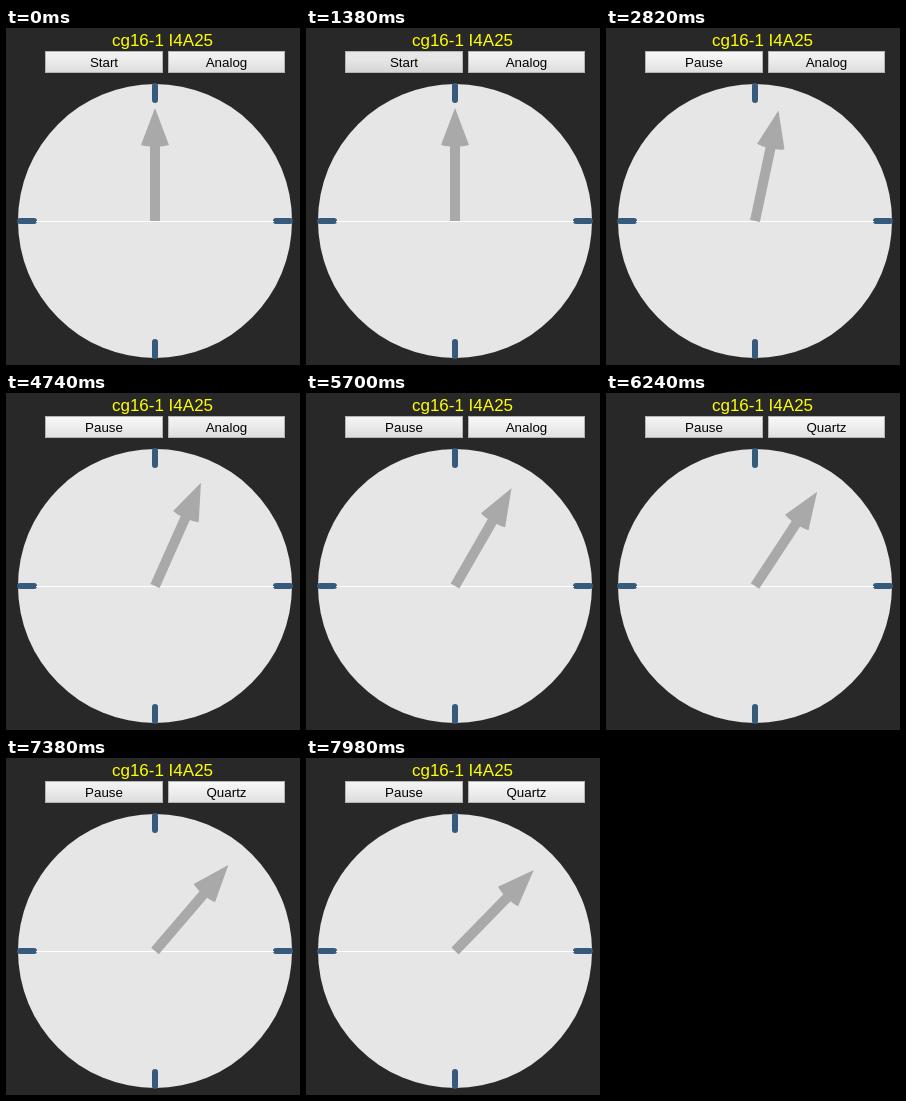
An HTML page that plays this animation: 294 by 337 pixels, repeating every 8000 ms.

```html
<!DOCTYPE html>
<html lang="en">
<head>
<meta charset="utf-8">
<title>Clock</title>
<style>
html, body { margin: 0; width: 100%; height: 100%; overflow: hidden; background: #292828; }
svg { display: block; width: 100%; height: 100%; }
text { font-family: "Liberation Sans", Arial, sans-serif; text-anchor: middle; }
</style>
</head>
<body>
<svg viewBox="0 0 294 337">
  <defs>
    <linearGradient id="idle" x2="0" y2="1">
      <stop stop-color="#f4f4f4"/><stop offset=".4" stop-color="#ececec"/><stop offset="1" stop-color="#dcdcdc"/>
    </linearGradient>
    <linearGradient id="hover" x2="0" y2="1">
      <stop stop-color="#f8f8f8"/><stop offset=".4" stop-color="#f0f0f0"/><stop offset="1" stop-color="#e0e0e0"/>
    </linearGradient>
    <linearGradient id="press" x2="0" y2="1">
      <stop stop-color="#e7e7e7"/><stop offset=".4" stop-color="#e5e5e5"/><stop offset="1" stop-color="#d6d6d6"/>
    </linearGradient>
  </defs>
  <rect width="294" height="337" fill="#292828"/>
  <text x="156.5" y="18" font-size="17" fill="#ff0">cg16-1 I4A25</text>
  <g id="run">
    <rect x="39.5" y="23.5" width="117" height="21" stroke="#b4b4b4"/>
    <text x="98" y="39" font-size="13.33"></text>
  </g>
  <g id="mode">
    <rect x="162.5" y="23.5" width="116" height="21" stroke="#b4b4b4"/>
    <text x="220.5" y="39" font-size="13.33"></text>
  </g>
  <circle cx="149" cy="193" r="137" fill="#e6e6e6"/>
  <path d="M149 58V72M149 314V328M14 193H28M270 193H284" stroke="#365a7b" stroke-width="6" stroke-linecap="round"/>
  <rect x="30" y="193" width="238" height="1" fill="#fff"/>
  <path id="hand" d="M149 80L163 117Q159 118.3 154 118.6V193H144V118.6Q139 118.3 135 117Z" fill="#a9a9a9"/>
</svg>
<script>
const LOOP = 8000, STEP = 60, TICK = 960;
const FIRST_TICK = 1860, SMOOTH_FROM = 6060;
const $ = id => document.getElementById(id);

const buttons = [
  { el: $('run'), labels: ['Start', 'Pause'], enter: 1080, down: 1380, up: 1500, leave: 4920 },
  { el: $('mode'), labels: ['Analog', 'Quartz'], enter: 5220, down: 5940, up: SMOOTH_FROM, leave: LOOP }
];

function angle(t) {
  const ticks = (t - FIRST_TICK) / TICK + 1;
  return 6 * Math.max(0, t < SMOOTH_FROM ? Math.floor(ticks) : ticks);
}

function drawButton(b, t) {
  const state = t >= b.down && t < b.up ? 'press'
    : t >= b.enter && t < b.leave ? 'hover' : 'idle';
  const [box, label] = b.el.children;
  box.setAttribute('fill', `url(#${state})`);
  label.textContent = b.labels[t < b.up ? 0 : 1];
}

function draw(now) {
  const t = Math.floor((now % LOOP) / STEP) * STEP;
  buttons.forEach(b => drawButton(b, t));
  $('hand').setAttribute('transform', `rotate(${angle(t)} 149 193)`);
}

const start = performance.now();
function loop() {
  draw(performance.now() - start);
  requestAnimationFrame(loop);
}
loop();
</script>
</body>
</html>
```
